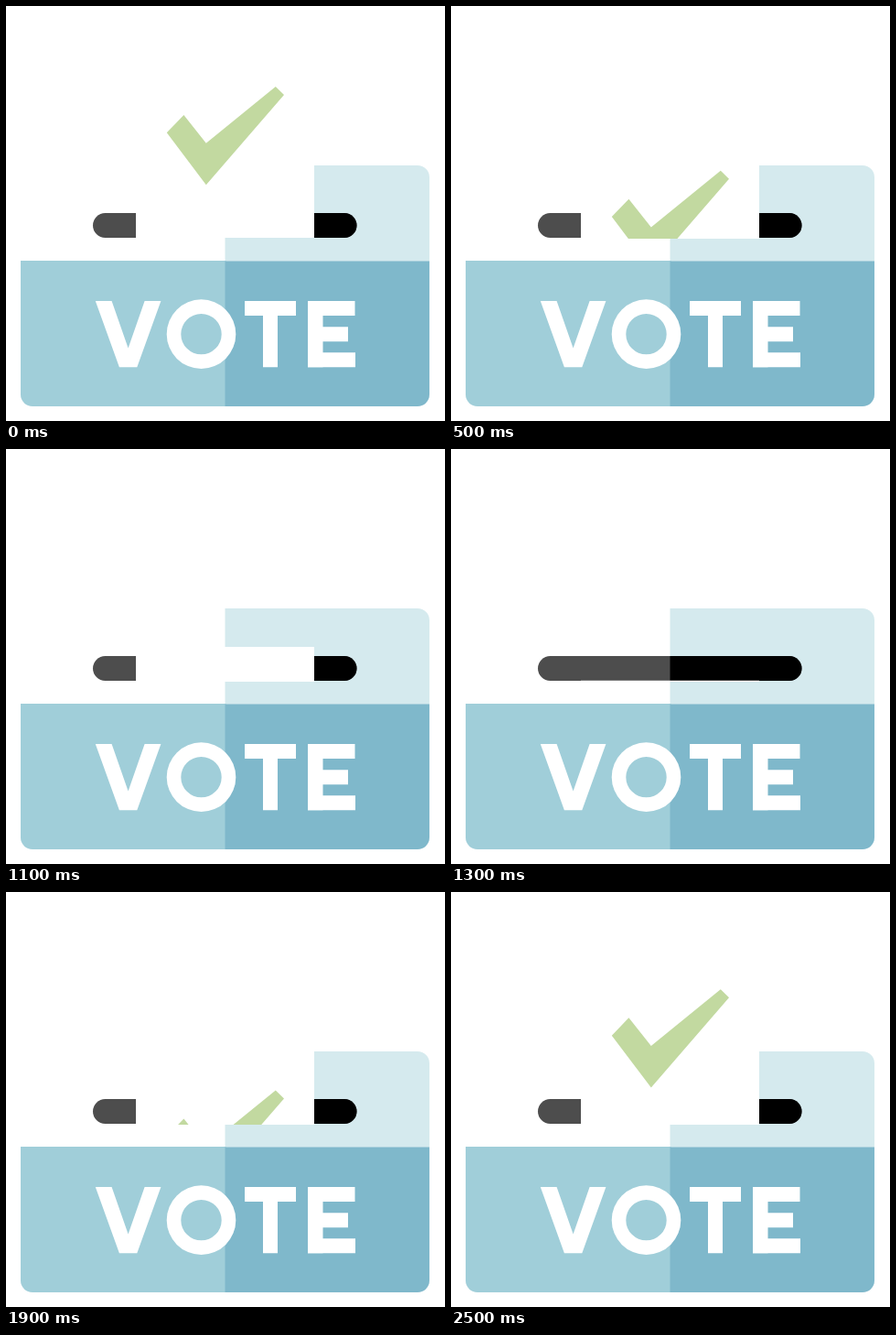
These frames come from a looping animation (480x453 px, 2.6 s). An HTML page with a canvas:

```html
<!DOCTYPE html>
<html lang="en">
<head>
<meta charset="utf-8">
<title>Ballot box</title>
<style>
  html, body { margin: 0; width: 100%; height: 100%; overflow: hidden; background: #fff; }
  canvas { display: block; }
</style>
</head>
<body>
<canvas id="stage" width="480" height="453" role="img" aria-label="VOTE"></canvas>
<script>
const ctx = document.getElementById('stage').getContext('2d');

const STEP = 100, STEPS = 26, HALF = STEPS / 2;
const DROP = 18.35;                     // pixels the ballot moves per step
const LEFT = 16, MID = 239.5, RIGHT = 463, BOTTOM = 437;
const SEAM = 278.5;                     // top edge of the front panel
const SLOT = { x: 95, y: 226, w: 288.5, h: 27 };
const CORNER = 13;
const CAP = 322, BASE = 394.3, BAR = 16; // lettering metrics

function rect(color, x, y, w, h, radii = 0) {
  ctx.fillStyle = color;
  ctx.beginPath();
  ctx.roundRect(x, y, w, h, radii);
  ctx.fill();
}

function poly(color, points) {
  ctx.fillStyle = color;
  ctx.beginPath();
  for (const [x, y] of points) ctx.lineTo(x, y);
  ctx.closePath();
  ctx.fill();
}

// Paints inside a rectangle only.
function within(x, y, w, h, paint) {
  ctx.save();
  ctx.beginPath();
  ctx.rect(x, y, w, h);
  ctx.clip();
  paint();
  ctx.restore();
}

function slot(color) {
  rect(color, SLOT.x, SLOT.y, SLOT.w, SLOT.h, SLOT.h / 2);
}

function box() {
  const half = RIGHT - MID;
  rect('#d5eaee', MID, 174, half, SEAM - 174 + 1, [0, CORNER, 0, 0]);
  rect('#a0ced9', LEFT, Math.floor(SEAM), MID - LEFT + 1, BOTTOM - Math.floor(SEAM), [0, 0, 0, CORNER]);
  rect('#7fb8cb', MID, SEAM, half, BOTTOM - SEAM, [0, 0, CORNER, 0]);
  slot('#4d4d4d');
  within(MID, 0, half, BOTTOM, () => slot('#000'));
}

function letterV(cx) {
  const side = s => [[cx + s * 9.7, BASE], [cx + s * 35.8, CAP], [cx + s * 18, CAP]];
  poly('#fff', [...side(-1), [cx, 373.5], ...side(1).reverse()]);
}

function letterO(cx) {
  ctx.beginPath();
  for (const r of [37.8, 22.2]) ctx.arc(cx, (CAP + BASE) / 2, r, 0, Math.PI * 2);
  ctx.fill('evenodd');
}

function letterT(cx) {
  rect('#fff', cx - 28, CAP, 56, BAR);
  rect('#fff', cx - BAR / 2, CAP, BAR, BASE - CAP);
}

function letterE(x) {
  rect('#fff', x, CAP, BAR + 0.5, BASE - CAP);
  const gap = (BASE - CAP - BAR) / 2;
  [51.5, 44, 52].forEach((w, i) => rect('#fff', x, CAP + i * gap, w, BAR));
}

function lettering() {
  letterV(133.6);
  letterO(213.5);
  letterT(289);
  letterE(330);
}

function ballot(drop) {
  within(0, 0, 480, 254, () => {
    ctx.translate(0, drop);
    rect('#fff', 142, 14.2, 195, SLOT.y + SLOT.h - 14.2);
    poly('#c2d9a0', [[294.8, 88], [304, 97], [218.8, 195.2], [175.8, 138.3], [194.4, 119], [218.8, 149.7]]);
  });
}

function draw() {
  const k = Math.floor(performance.now() / STEP) % STEPS;
  rect('#fff', 0, 0, 480, 453);
  box();
  lettering();
  ballot(DROP * (HALF - Math.abs(HALF - k)));
  requestAnimationFrame(draw);
}

draw();
</script>
</body>
</html>
```
